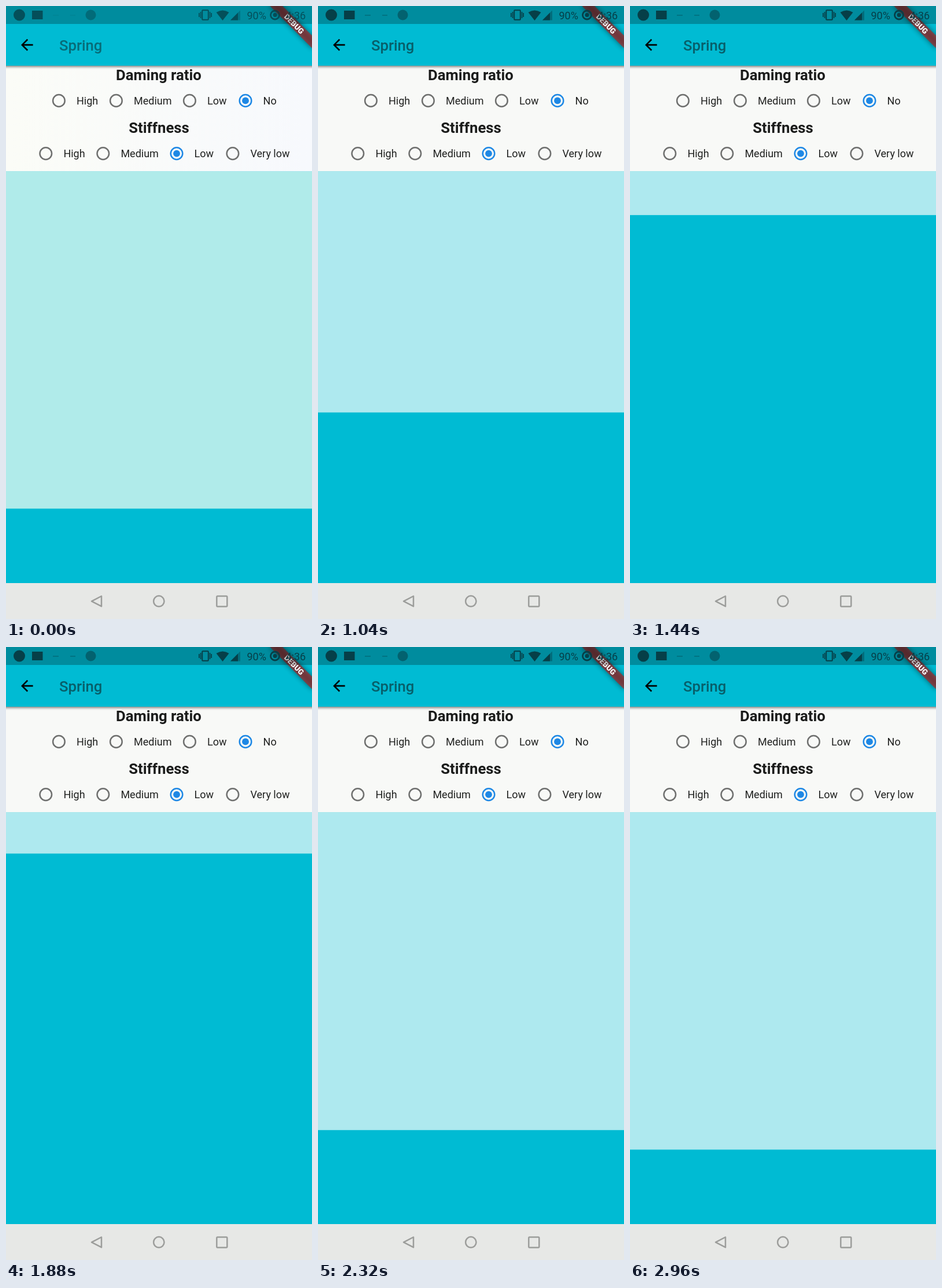
Animation, 529 px wide and 1058 px high, one loop 3000 ms. Source, as an HTML page:

```html
<!DOCTYPE html>
<html lang="en">
<head>
<meta charset="utf-8">
<title>Spring</title>
<style>
  html, body { margin: 0; width: 100%; height: 100%; overflow: hidden; background: #00bbd3; }
  svg { display: block; width: 100%; height: 100%; font-family: Roboto, sans-serif; }
  .heading { font-size: 25.7px; font-weight: 700; text-anchor: middle; fill: #1b1c1b; }
  .label { font-size: 18px; fill: #1f201f; }
  .ring { fill: none; stroke: #6f706f; stroke-width: 2.5; }
  .on .ring { stroke: #1e88e5; }
  .dot { fill: #1e88e5; }
  .page { fill: #f8f9f7; }
  .panel { fill: #aee9ef; }
  .title { font-size: 25.7px; font-weight: 500; fill: #075f6a; }
  .status { fill: #063f48; font-size: 18px; }
  .nav { fill: none; stroke: #9c9d9b; stroke-width: 2.5; stroke-linejoin: round; }
  .soft .page { fill: url(#tint); }
  .soft .panel { fill: #b0ebea; }
  .soft .title { fill: #076c78; }
  .soft .status { opacity: .78; }
  .soft .dash { opacity: .2; }
</style>
</head>
<body>
<svg id="stage" viewBox="0 0 529 1058" preserveAspectRatio="none">
  <defs>
    <linearGradient id="tint">
      <stop offset="0" stop-color="#fbfcf7"/>
      <stop offset="1" stop-color="#f7f9fd"/>
    </linearGradient>
    <filter id="blur" x="-50%" y="-150%" width="200%" height="400%">
      <feGaussianBlur stdDeviation="5"/>
    </filter>
    <filter id="drop" x="-5%" y="-20%" width="110%" height="150%">
      <feGaussianBlur stdDeviation="2.2"/>
    </filter>
  </defs>

  <rect width="529" height="1058" fill="#00bbd3"/>
  <rect class="panel" id="panel" y="285.5" width="529" height="582"/>

  <rect class="page" y="100" width="529" height="185.5"/>
  <rect x="-10" y="60" width="549" height="45" opacity=".5" filter="url(#drop)"/>
  <rect width="529" height="103" fill="#00bbd3"/>
  <text class="heading" x="264" y="127.500">Daming ratio</text>
  <text class="heading" x="264.500" y="218.500">Stiffness</text>
  <g id="options"></g>

  <path transform="translate(20.900 51.700) scale(1.286)" d="M20 11H7.830l5.590-5.590L12 4l-8 8 8 8 1.410-1.410L7.830 13H20z"/>
  <text class="title" x="92" y="77">Spring</text>

  <!-- corner ribbon -->
  <g transform="translate(529 0) rotate(45)">
    <rect x="-51.400" y="36" width="102.800" height="15.400" opacity=".5" filter="url(#blur)"/>
    <rect x="-51.400" y="36" width="102.800" height="15.400" fill="#b71c1c" fill-opacity=".627"/>
    <text y="48.300" font-size="13.100" font-weight="900" text-anchor="middle" fill="#fff">DEBUG</text>
  </g>

  <!-- status bar -->
  <rect width="529" height="31" opacity=".25"/>
  <g class="status">
    <circle cx="23" cy="15.500" r="10"/>
    <rect x="45" y="8" width="18.500" height="15"/>
    <path class="dash" d="M81 15.500h10v1H81zM111 15.500h9v1h-9z" opacity=".6"/>
    <circle cx="146.500" cy="15.500" r="9" opacity=".55"/>
    <rect x="339.200" y="7.200" width="10.600" height="16.600" rx="1" fill="none" stroke="#063f48" stroke-width="2"/>
    <path d="M333 12h1.700v7H333zM335.700 10h1.700v11h-1.700zM351.700 10h1.700v11h-1.700zM354.300 12h1.700v7h-1.700z"/>
    <path d="M363.500 11Q374.500 4 385.500 11L374.500 25z"/>
    <path d="M388 24.500L405 7.500V24.500z" opacity=".4"/>
    <path d="M388 24.500L401 11.500V24.500z"/>
    <text x="416.500" y="22.500">90%</text>
    <circle cx="465" cy="15.500" r="7.500" fill="none" stroke="#063f48" stroke-width="2.800"/>
    <circle cx="465" cy="15.500" r="3.500"/>
    <text x="483.500" y="22.500">4:36</text>
  </g>

  <!-- navigation bar -->
  <rect y="996" width="529" height="62" fill="#e7e8e6"/>
  <g class="nav">
    <path d="M148 1027.300L165 1018.500V1036.200z"/>
    <circle cx="264.300" cy="1027.300" r="9.200"/>
    <rect x="364.300" y="1018.400" width="18" height="18" rx="1.500"/>
  </g>
</svg>
<script>
  const stage = document.getElementById("stage");
  const panel = document.getElementById("panel");

  const LOOP = 3000, STEP = 40;
  const TOP = 285.5, OPEN = 867.5, SHUT = 356.5;
  const CLOSE_AT = 957.6, OPEN_AT = 2008.5, CLEAR_AT = 920;
  const OMEGA = Math.sqrt(200); // stiffness 200, unit mass

  function addRow(y, names, xs, chosen) {
    document.getElementById("options").innerHTML += names.map((name, i) => {
      const on = i === chosen;
      const cx = xs[i] - 30.6;
      return `<g class="${on ? "on" : ""}">
        <circle class="ring" cx="${cx}" cy="${y}" r="10.3"/>
        ${on ? `<circle class="dot" cx="${cx}" cy="${y}" r="5.9"/>` : ""}
        <text class="label" x="${xs[i]}" y="${y + 6.5}">${name}</text></g>`;
    }).join("");
  }

  addRow(163.4, ["High", "Medium", "Low", "No"], [122, 221, 348, 444.6], 3);
  addRow(254.6, ["High", "Medium", "Low", "Very low"], [99.4, 198.4, 325.6, 422.5], 2);

  // Critically damped spring, released at rest.
  function spring(from, to, ms) {
    const p = OMEGA * Math.max(0, ms) / 1000;
    return to + (from - to) * (1 + p) * Math.exp(-p);
  }

  function draw() {
    const t = Math.floor(performance.now() % LOOP / STEP) * STEP;
    const edge = t < OPEN_AT
      ? spring(OPEN, SHUT, t - CLOSE_AT)
      : spring(SHUT, OPEN, t - OPEN_AT);
    panel.setAttribute("height", edge - TOP);
    stage.classList.toggle("soft", t < CLEAR_AT);
    requestAnimationFrame(draw);
  }
  draw();
</script>
</body>
</html>
```
